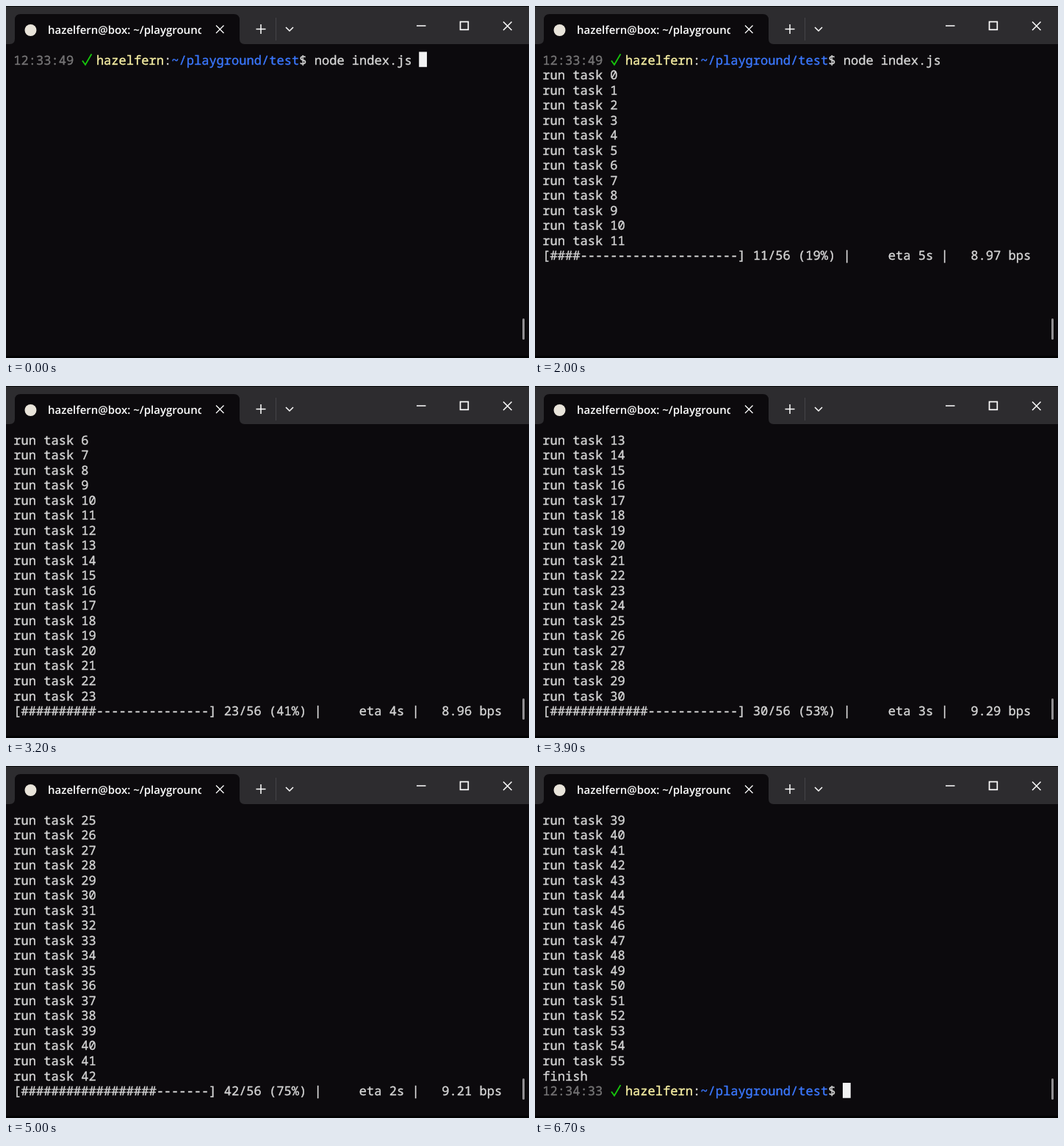
Animation, 712 px wide and 480 px high, one loop 6.8 s. Source, as an HTML page:

```html
<!DOCTYPE html>
<html lang="en">
<head>
<meta charset="utf-8">
<title>Terminal progress</title>
<style>
  html, body { margin: 0; width: 100%; height: 100%; overflow: hidden; background: #0c0a0d; }
  svg { display: block; width: 712px; height: 480px; }
  text { white-space: pre; text-rendering: geometricPrecision; }
  .term { font: 17.06px "Noto Sans Mono", "DejaVu Sans Mono", monospace; color: #d6d6d6; }
  .term text { fill: currentColor; stroke: currentColor; stroke-width: 0.35; }
  .title { font: 600 15px "Open Sans", "Noto Sans", sans-serif; fill: #fff; }
  .icon { fill: none; stroke: #fff; stroke-width: 1.5; }
</style>
</head>
<body>
<svg viewBox="0 0 712 480">
  <defs><clipPath id="titleClip"><rect x="50" y="16" width="216" height="32"/></clipPath></defs>
  <rect width="712" height="480" fill="#0c0a0d"/>
  <rect width="712" height="52" fill="#2d2c2f"/>
  <rect width="712" height="1" fill="#0a0a0a"/>
  <path d="M5 52Q12 52 12 45V19Q12 11 20 11H310Q318 11 318 19V45Q318 52 325 52Z" fill="#0c0a0d"/>
  <circle cx="33.5" cy="33" r="8" fill="#e9e4da"/>
  <text class="title" x="57" y="38" clip-path="url(#titleClip)">hazelfern@box: ~/playground/test</text>
  <path d="M367.5 16V47" stroke="#454448"/>
  <g class="icon">
    <path d="M286 26.5l10.5 10.5m0-10.5l-10.5 10.5" stroke-width="1.3"/>
    <path d="M340.5 31.5h13m-6.5-6.5v13"/>
    <path d="M381 29l5 5 5-5"/>
    <path d="M559 27h12.5"/>
    <rect x="618.5" y="21.5" width="10.8" height="10.8" stroke-width="1.7"/>
    <path d="M677 21.5l11.5 11.5m0-11.5l-11.5 11.5"/>
  </g>
  <g id="screen" class="term"></g>
  <rect x="703" y="426" width="3" height="29" rx="1.5" fill="#918f92"/>
  <rect y="477" width="712" height="3" fill="#020203"/>
</svg>
<script>
const LOOP = 6800, STEP = 100, TOTAL = 56, BAR = 25, LAST_ROW = 18;
const LEFT = 10.3, COLUMN = 10.236, BASELINE = 79.5, LINE = 20.53;
const COLORS = { grey: "#777677", yellow: "#f9f1a5", blue: "#3b78ff", green: "#16c60c" };

// Tasks run slightly faster than one per step
const TASKS_PER_STEP = 1.021, TASK_OFFSET = 8.955;

// Average speed and eta are refreshed about once a second
const TASKS_PER_SAMPLE = 9.35;
const RATES = ["0", "8.97", "8.96", "9.29", "9.21", "9.16"];

const screen = document.getElementById("screen");
const columnX = column => LEFT + column * COLUMN;

const put = (text, row, column = 0, color = "") =>
  `<text x="${columnX(column)}" y="${BASELINE + row * LINE}"${color && ` color="${color}"`}>${text}</text>`;

function prompt(row, clock, command = "") {
  return put(clock, row, 0, COLORS.grey) +
    `<path d="M104 ${74.5 + row * LINE}l4 5.5 8.5-14.5" fill="none" stroke="${COLORS.green}" stroke-width="1.8"/>` +
    put("hazelfern", row, 11, COLORS.yellow) +
    put(":", row, 20) +
    put("~/playground/test", row, 21, COLORS.blue) +
    put("$ " + command, row, 38);
}

const cursor = (row, column) =>
  `<rect x="${columnX(column) - 0.8}" y="${62.5 + row * LINE}" width="10.8" height="20.7" fill="#f2f2f2"/>`;

function status(done) {
  const filled = Math.floor(done / TOTAL * BAR);
  const percent = Math.floor(done / TOTAL * 100);
  const sample = Math.floor((done + 1) / TASKS_PER_SAMPLE);
  const rate = RATES[sample];
  const remaining = TOTAL - Math.floor(sample * TASKS_PER_SAMPLE);
  const eta = sample > 0 ? Math.floor(remaining / rate) + "s" : "--";
  return `[${"#".repeat(filled)}${"-".repeat(BAR - filled)}] ` +
    `${done}/${TOTAL}`.padStart(5) + " " + `(${percent}%)`.padStart(5) + " | " +
    `eta ${eta}`.padStart(10) + " | " + `${rate} bps`.padStart(10);
}

function render(time) {
  const task = Math.floor(Math.floor(time / STEP) * TASKS_PER_STEP - TASK_OFFSET);
  const finished = task >= TOTAL;
  const lastTask = Math.min(task, TOTAL - 1);
  const lastLine = task < 0 ? 0 : lastTask + (finished ? 3 : 2);
  const top = Math.max(0, lastLine - LAST_ROW);
  let out = top === 0 ? prompt(0, "12:33:49", "node index.js") : "";
  for (let i = Math.max(0, top - 1); i <= lastTask; i++) out += put("run task " + i, i + 1 - top);
  if (task < 0) {
    out += cursor(0, 54);
  } else if (finished) {
    out += put("finish", LAST_ROW - 1) + prompt(LAST_ROW, "12:34:33") + cursor(LAST_ROW, 40);
  } else {
    out += put(status(task), lastLine - top);
  }
  return out;
}

const start = performance.now();
let shown = "";
function frame() {
  const next = render((performance.now() - start) % LOOP);
  if (next !== shown) screen.innerHTML = shown = next;
  requestAnimationFrame(frame);
}
frame();
</script>
</body>
</html>
```
